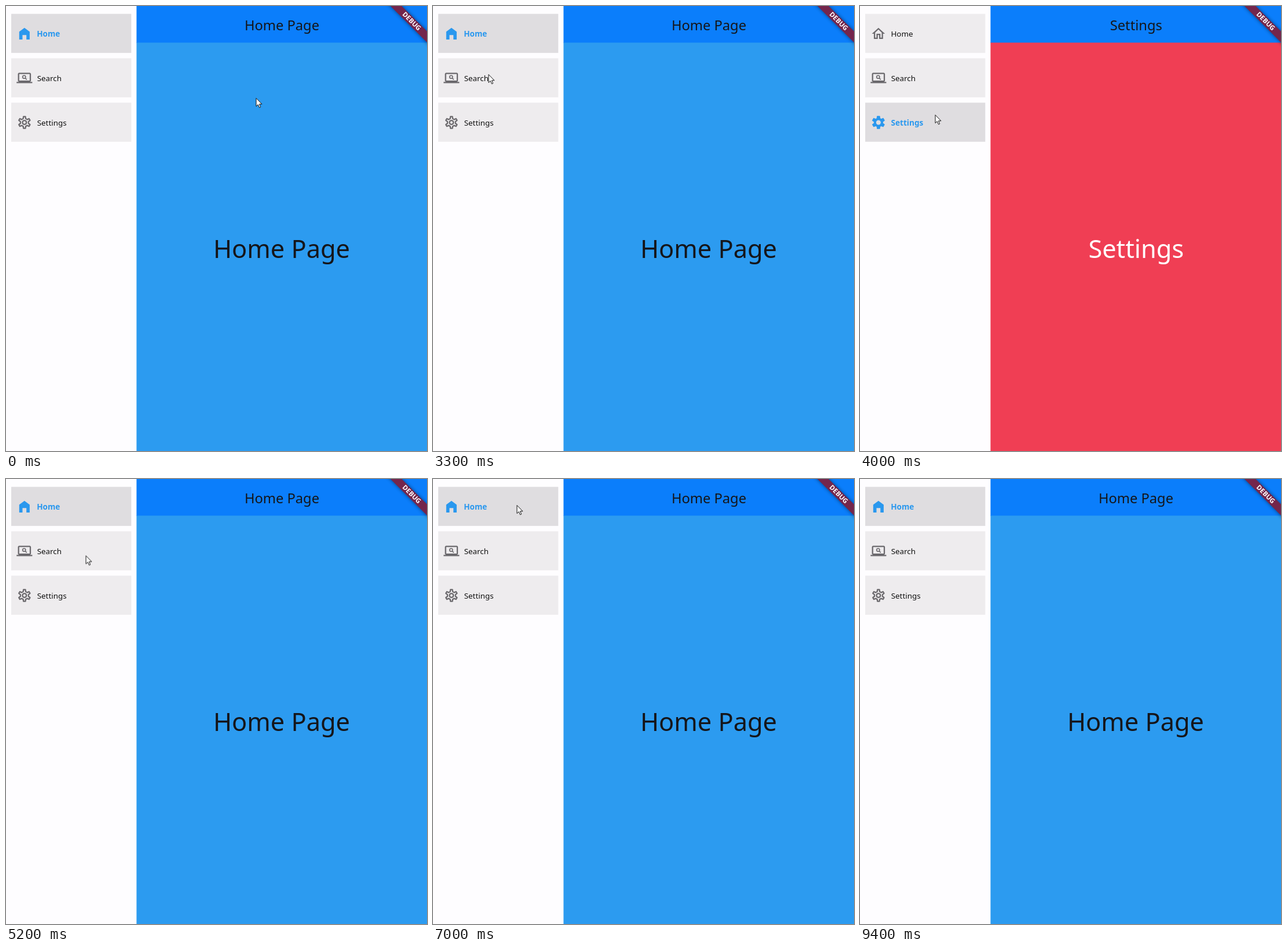
Write an HTML page that moves like this. It is 727x770 px and loops after 9.5 s.

```html
<!DOCTYPE html>
<html lang="en">
<head>
<meta charset="utf-8">
<title>Sidebar navigation</title>
<style>
  html, body { margin: 0; width: 100%; height: 100%; overflow: hidden; background: #fefdff; }
  svg { display: block; }
  text { font-family: "Noto Sans", "Open Sans", sans-serif; fill: #151519; }
  .title { font-size: 23.7px; text-anchor: middle; }
  .big { font-size: 43.3px; text-anchor: middle; }
  .label { font-size: 13.4px; fill: #111; }
  .on .label { font-size: 13.6px; font-weight: 700; fill: #2a98ee; }
  .tile { fill: #eeecee; }
  .on .tile { fill: #dfdde0; }
  .icon { fill: #6b696d; stroke: #6b696d; stroke-width: 0; }
  .on .icon { fill: #2a98ee; stroke: #2a98ee; }
  .line { fill: none; stroke-width: 2; stroke-linejoin: round; }
  .debug { font-size: 11.5px; font-weight: 900; fill: #fff; text-anchor: middle; }

  .home { animation: home 9.5s step-end infinite; }
  .settings { animation: settings 9.5s step-end infinite; }
  .cursor { animation: move 9.5s linear infinite, leave 9.5s step-end infinite; }

  @keyframes home {
    0%, 49.47%, 71.58% { visibility: visible; }
    40%, 58.95% { visibility: hidden; }
  }
  @keyframes settings {
    0%, 49.47%, 71.58% { visibility: hidden; }
    40%, 58.95% { visibility: visible; }
  }
  @keyframes move {
    0% { transform: translate(432px, 159px); }
    24.2% { transform: translate(432px, 159px); animation-timing-function: ease-in-out; }
    33.68%, 35.2% { transform: translate(96px, 118px); }
    39.5%, 43.5% { transform: translate(130px, 188px); animation-timing-function: ease-in-out; }
    48.6%, 50.5% { transform: translate(137px, 50px); animation-timing-function: ease-in; }
    54.74% { transform: translate(138px, 132px); animation-timing-function: ease-out; }
    58.5%, 64.5% { transform: translate(153px, 216px); animation-timing-function: ease-in-out; }
    71%, 85.3% { transform: translate(145px, 45px); animation-timing-function: ease-in-out; }
    91.6%, 100% { transform: translate(640px, 612px); }
  }
  @keyframes leave {
    0% { visibility: visible; }
    91.6%, 100% { visibility: hidden; }
  }
</style>
</head>
<body>
<svg width="727" height="770" viewBox="0 0 727 770">
  <defs>
    <filter id="soft" x="-20%" y="-100%" width="140%" height="300%">
      <feGaussianBlur stdDeviation="3"/>
    </filter>
    <path id="houseFull" d="M12 3 4 9v12h5v-7h6v7h5V9z"/>
    <path id="houseLine" d="M12 5.69l5 4.5V18h-2v-6H9v6H7v-7.81zM12 3 2 12h3v8h6v-6h2v6h6v-8h3z" fill-rule="evenodd"/>
    <g id="laptop">
      <path d="M20 18c1.1 0 2-.9 2-2V6c0-1.1-.9-2-2-2H4c-1.1 0-2 .9-2 2v10c0 1.1.9 2 2 2H0v2h24v-2zM4 6h16v10H4z" fill-rule="evenodd"/>
      <circle class="line" cx="11.5" cy="10.5" r="2.3" style="stroke-width:1.4"/>
      <path class="line" d="M13.2 12.2l2.3 2.3" style="stroke-width:1.5"/>
    </g>
    <g id="gearFull" transform="translate(12 12)">
      <path class="gear" data-tooth="2.35,-6.3,1.95,-9.55" fill-rule="evenodd" stroke-width=".9" stroke-linejoin="round" data-hole="4.05"/>
    </g>
    <g id="gearLine" transform="translate(12 12)">
      <path class="gear line" data-tooth="1.9,-5.9,1.5,-9"/>
      <circle class="line" r="3"/>
    </g>
  </defs>

  <rect width="727" height="770" fill="#fefdff"/>
  <rect x="225.4" width="501.6" height="64" fill="#0b7efb"/>

  <g>
    <rect class="tile" x="9" y="90.5" width="207.3" height="67.6"/>
    <use class="icon" href="#laptop" transform="translate(18.3 111) scale(1.129)"/>
    <text class="label" x="53.7" y="130">Search</text>
  </g>

  <g class="home">
    <rect x="225.4" y="63.4" width="501.6" height="706.6" fill="#2c9bf0"/>
    <text class="title" x="476.5" y="41.5">Home Page</text>
    <text class="big" x="476" y="436">Home Page</text>
    <g class="on">
      <rect class="tile" x="9" y="13.6" width="207.3" height="67.6"/>
      <use class="icon" href="#houseFull" transform="translate(18.3 34.4) scale(1.129)"/>
      <text class="label" x="53.2" y="53">Home</text>
    </g>
    <rect class="tile" x="9" y="167.3" width="207.3" height="67.6"/>
    <use class="icon" href="#gearLine" transform="translate(18.3 188) scale(1.129)"/>
    <text class="label" x="53.7" y="207">Settings</text>
  </g>

  <g class="settings">
    <rect x="225.4" y="63.4" width="501.6" height="706.6" fill="#f03e54"/>
    <text class="title" x="476.8" y="41.5">Settings</text>
    <text class="big" x="476.8" y="436" style="fill:#fff">Settings</text>
    <rect class="tile" x="9" y="13.6" width="207.3" height="67.6"/>
    <use class="icon" href="#houseLine" transform="translate(18.3 34.4) scale(1.129)"/>
    <text class="label" x="53.4" y="53">Home</text>
    <g class="on">
      <rect class="tile" x="9" y="167.3" width="207.3" height="67.6"/>
      <use class="icon" href="#gearFull" transform="translate(18.3 188) scale(1.129)"/>
      <text class="label" x="53.5" y="207">Settings</text>
    </g>
  </g>

  <g transform="translate(727 0) rotate(45)">
    <rect x="-60" y="31" width="120" height="13.6" opacity=".5" filter="url(#soft)"/>
    <rect x="-60" y="31" width="120" height="13.6" fill="#74264c"/>
    <text class="debug" x="0" y="41.2">DEBUG</text>
  </g>

  <path class="cursor" d="M0 .5V14.6L3.2 11.6 5.5 16.8 7.7 15.9 5.5 10.8H10z" fill="#fff" stroke="#111" stroke-width="1"/>
</svg>
<script>
  // Repeat one tooth six times around the centre.
  function gearPath([baseX, baseY, tipX, tipY]) {
    const tooth = [[-baseX, baseY], [-tipX, tipY], [tipX, tipY], [baseX, baseY]];
    const points = [];
    for (let k = 0; k < 6; k++) {
      const c = Math.cos(k * Math.PI / 3), s = Math.sin(k * Math.PI / 3);
      for (const [x, y] of tooth) points.push((c * x - s * y).toFixed(2) + " " + (s * x + c * y).toFixed(2));
    }
    return "M" + points.join("L") + "Z";
  }

  for (const el of document.querySelectorAll(".gear")) {
    const { tooth, hole: r } = el.dataset;
    const hole = r ? `M${-r} 0a${r} ${r} 0 1 0 ${2 * r} 0a${r} ${r} 0 1 0 ${-2 * r} 0Z` : "";
    el.setAttribute("d", gearPath(tooth.split(",").map(Number)) + hole);
  }
</script>
</body>
</html>
```
